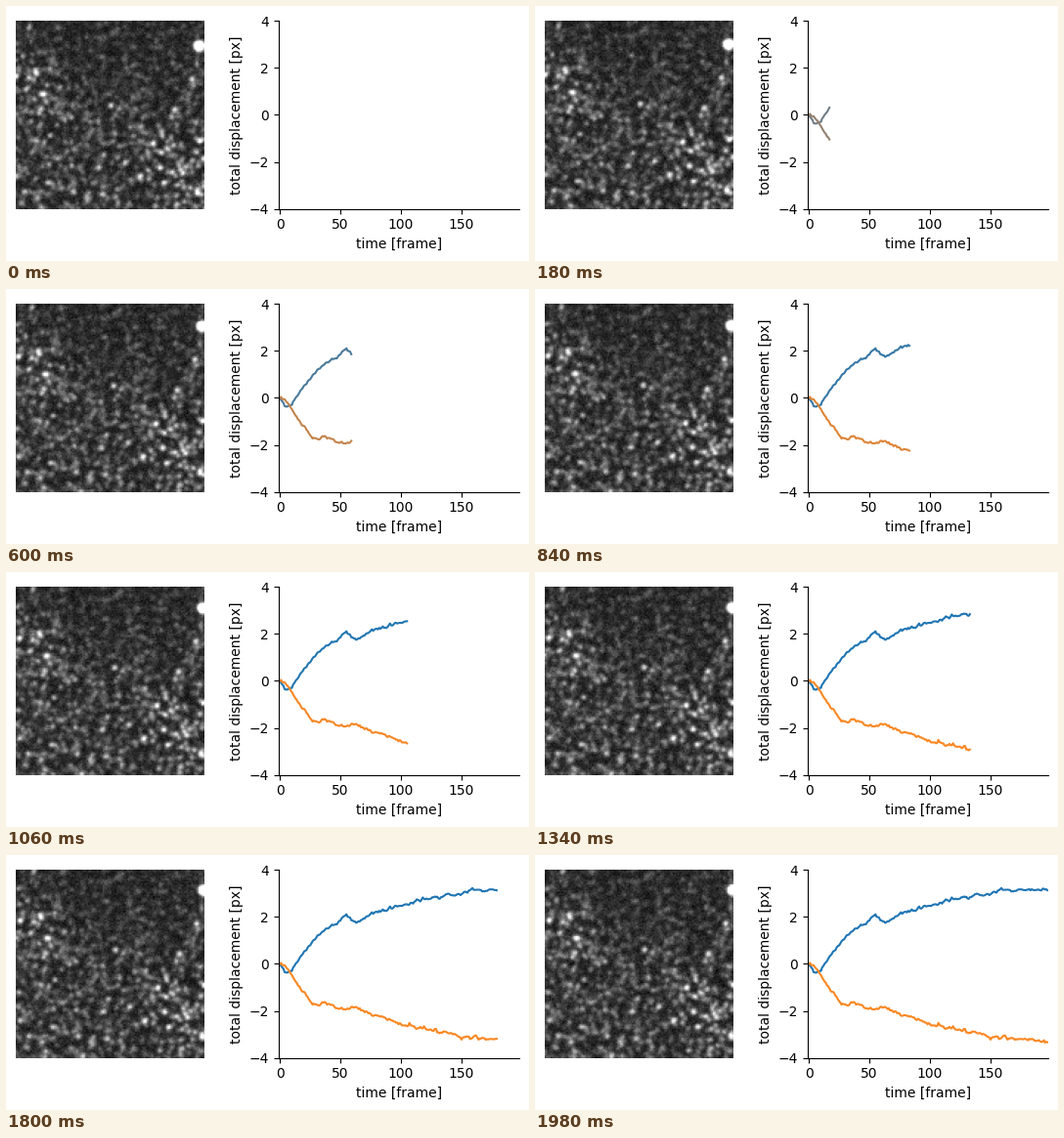
These frames come from a looping animation (535x261 px, 2000 ms). A matplotlib script:

```python
import numpy as np
import matplotlib.pyplot as plt
from matplotlib.animation import FuncAnimation

W, H, DPI = 535, 261, 100
FRAMES, STEP, SIZE = 100, 2, 128
LEFT, BOTTOM, SIDE = 10, 53.31, 192.5
TOP = H - BOTTOM - SIDE
PX = SIDE / SIZE  # screen pixels per image pixel

rng = np.random.default_rng(11)
time = np.arange(198)


def drift(keys, wobble=.035):
    """Path through a few (time, value) keys with correlated jitter."""
    noise = np.zeros(time.size)
    for k in time[1:]:
        noise[k] = .6 * noise[k - 1] + rng.normal(0, wobble)
    return np.interp(time, *zip(*keys)) + noise


dx = drift([(0, 0), (4, -.38), (9, -.33), (28, 1.1), (55, 2.05), (63, 1.75),
            (80, 2.2), (120, 2.75), (160, 3.1), (197, 3.2)])
dy = drift([(0, 0), (5, -.1), (12, -.7), (26, -1.65), (40, -1.68), (54, -2),
            (62, -1.88), (100, -2.55), (150, -3.1), (197, -3.3)])


def density(x, y):
    """How crowded the specimen is: dark hollows and a bright edge."""
    w = np.full_like(x, .85)
    for cx, cy, r, a in [(.38, .1, .2, -.6), (.78, .4, .15, -.45),
                         (.85, .05, .15, -.3), (.95, .68, .2, .7),
                         (.1, .35, .2, .3)]:
        w += a * np.exp(-((x / SIZE - cx)**2 + (y / SIZE - cy)**2) / (2 * r * r))
    return np.maximum(w, .1)


# Faint random specks, a few bright beads and one saturated blob
N = 2400
BEADS = [(190, 75), (31, 69), (39, 90), (36, 105), (10, 174), (19, 190),
         (69, 190), (95, 165), (137, 174), (107, 102)]
BLOB = (197, 41)
sx, sy = rng.uniform(-8, SIZE + 8, (2, N))
bx, by = np.array(BEADS + [BLOB]).T
amp = np.r_[rng.gamma(2, 18, N) * density(sx, sy), [170] * len(BEADS), 900]
sigma = np.r_[[1.25] * N, [1.45] * len(BEADS), 1.9]
sx = np.r_[sx, (bx - LEFT) / PX]
sy = np.r_[sy, (by - TOP) / PX]
grid = np.arange(SIZE)[:, None] + .5


def bell(center):
    return np.exp(-((grid - center) / sigma)**2 / 2)


def specimen(i):
    k = max(STEP * i - 1, 0)
    img = (bell(sy + dy[k]) * amp) @ bell(sx + dx[k]).T
    noise = np.random.default_rng(1000 + i).normal(0, 10, (SIZE, SIZE))
    return np.clip(31 + img + noise, 0, 255)


def tint(color, i):
    """Fade a line from grey to its full colour."""
    s = min(i / 55, 1)
    return .5 + s * (np.array(color) - .5)


def panel(left, width):
    return fig.add_axes([left / W, BOTTOM / H, width / W, SIDE / H])


fig = plt.figure(figsize=(W / DPI, H / DPI), dpi=DPI, facecolor="white")

view = panel(LEFT, SIDE)
view.axis("off")
image = view.imshow(specimen(0), cmap="gray", vmin=0, vmax=255, aspect="auto")

plot = panel(278.86, 246.59)
plot.spines[["top", "right"]].set_visible(False)
plot.set(xlim=(-1, 198), ylim=(-4, 4), xticks=range(0, 200, 50),
         yticks=range(-4, 5, 2), xlabel="time [frame]",
         ylabel="total displacement [px]")
tracks = [(plot.plot([], [])[0], data, color) for data, color in
          ((dx, (.12, .46, .70)), (dy, (.98, .53, .13)))]


def update(i):
    n = STEP * i
    image.set_data(specimen(i))
    for line, data, color in tracks:
        line.set_data(time[:n], data[:n])
        line.set_color(tint(color, i))
    return [image] + [line for line, *_ in tracks]


anim = FuncAnimation(fig, update, frames=FRAMES, interval=20, repeat=True)
plt.show()
```
